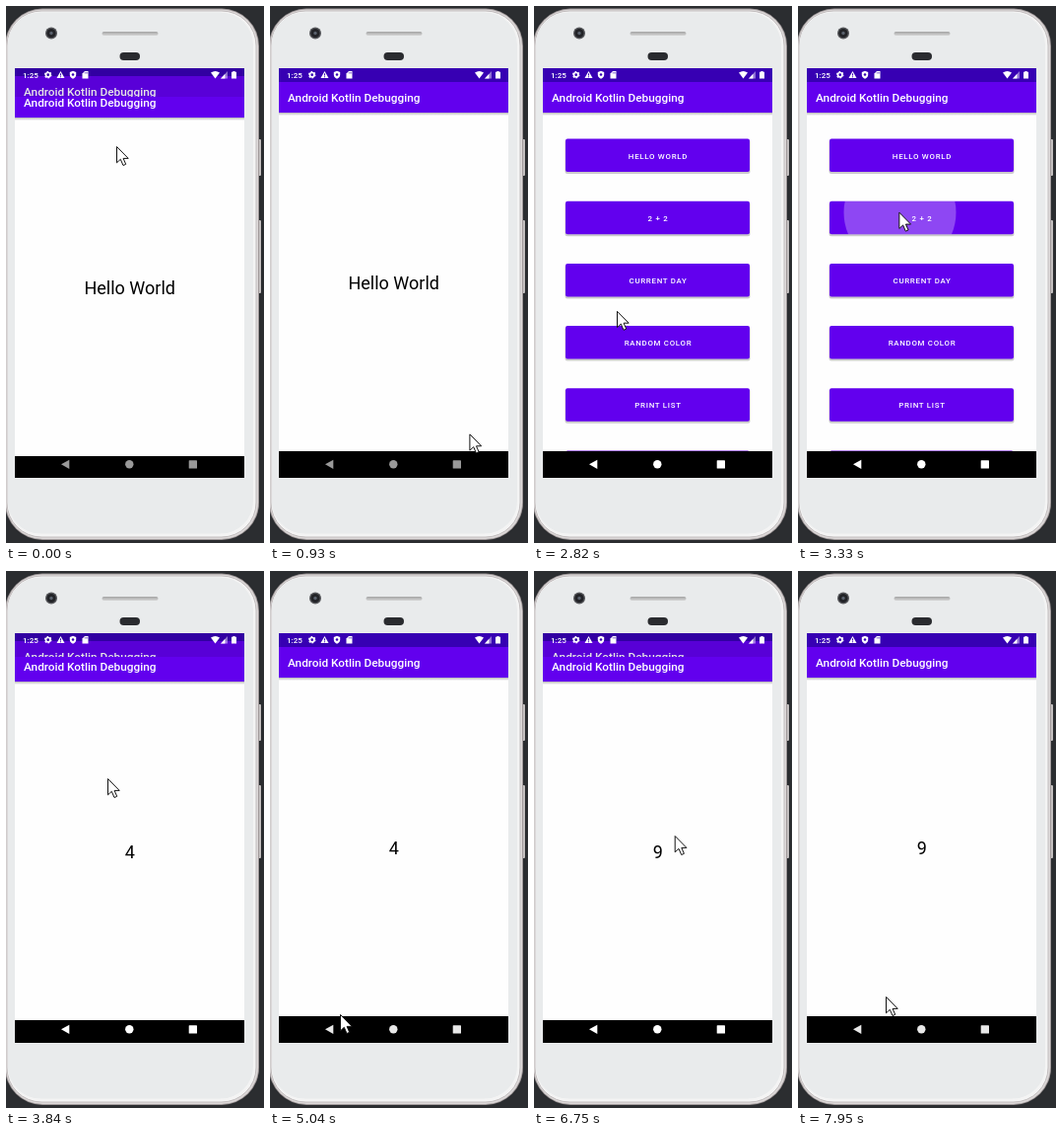
An HTML page for the animation above (8 s loop, 262x544 px).

```html
<!DOCTYPE html>
<html lang="en">
<head>
<meta charset="utf-8">
<title>Phone demo</title>
<style>
  html, body { margin: 0; width: 100%; height: 100%; overflow: hidden; background: #2b2d30; }
  svg { display: block; }
  text { font-family: Roboto, sans-serif; }
  .bar { font-size: 11.8px; font-weight: 500; fill: #fff; }
  .btn { font-size: 7.9px; font-weight: 500; letter-spacing: .089em; fill: #fff; text-anchor: middle; }
</style>
</head>
<body>
<svg width="262" height="544" viewBox="0 0 262 544">
  <defs>
    <linearGradient id="shade" x2="0" y2="1">
      <stop stop-color="#000" stop-opacity=".28"/>
      <stop offset="1" stop-color="#000" stop-opacity="0"/>
    </linearGradient>
    <linearGradient id="speaker" x2="0" y2="1">
      <stop stop-color="#a3a3a3"/>
      <stop offset="1" stop-color="#d6d6d6"/>
    </linearGradient>
    <clipPath id="screen"><rect x="9" y="63" width="233" height="415"/></clipPath>
    <clipPath id="reveal"><rect id="edge" x="9" width="233" height="420"/></clipPath>
    <clipPath id="ink"><rect id="inkBox" x="32" width="187" height="33.5" rx="2"/></clipPath>
    <g id="window">
      <rect x="9" y="55" width="233" height="430" fill="#fefefe"/>
      <rect x="9" y="108" width="233" height="3" fill="url(#shade)"/>
      <rect x="9" y="63" width="233" height="14" fill="#3700b3"/>
      <rect x="9" y="77" width="233" height="31" fill="#6200ee"/>
      <text class="bar" x="18" y="97">Android Kotlin Debugging</text>
    </g>
    <rect id="navBar" x="9" y="451" width="233" height="45"/>
  </defs>

  <!-- phone body -->
  <rect x="256" y="135" width="3" height="37" rx="1" fill="#c4c0c0"/>
  <rect x="256" y="217" width="3" height="74" rx="1" fill="#c4c0c0"/>
  <rect x="-1" y="2.5" width="258" height="538.5" rx="38" fill="#a29b9c"/>
  <rect x="0" y="3.5" width="256" height="536.5" rx="37" fill="#dedada"/>
  <rect x="1" y="5" width="253" height="533" rx="35" fill="#f4f4f4" stroke="#c3bebf"/>
  <rect x="2" y="6.5" width="249" height="528" rx="33" fill="#e9ebec"/>
  <circle cx="46" cy="27.5" r="6" fill="#55565a"/>
  <circle cx="46" cy="27.5" r="4.6" fill="#222327"/>
  <circle cx="46" cy="27.5" r="1.7" fill="#5a616c"/>
  <rect x="97.5" y="26" width="57" height="4" rx="2" fill="url(#speaker)"/>
  <rect x="115.5" y="47" width="20.5" height="8" rx="4" fill="#2a2b2f"/>

  <g clip-path="url(#screen)">
    <g id="back">
      <use href="#window"/>
      <g id="buttons"></g>
      <g id="ripples" clip-path="url(#ink)" fill="#fff">
        <circle id="wave"/>
        <circle id="echo" cx="125.5" cy="278"/>
      </g>
      <g id="labels"></g>
      <use href="#navBar"/>
    </g>
    <rect id="dim" x="9" y="63" width="233" height="415"/>
    <g id="front" clip-path="url(#reveal)">
      <g id="slide">
        <use href="#window"/>
        <text id="result" x="125.7" y="287" font-size="18" text-anchor="middle"></text>
        <use href="#navBar"/>
      </g>
    </g>

    <!-- status icons -->
    <text x="17" y="73" font-size="8" font-weight="500" fill="#fff">1:25</text>
    <g fill="#fff">
      <circle cx="42.7" cy="69.7" r="2.2" fill="none" stroke="#fff" stroke-width="1.7"/>
      <circle cx="42.7" cy="69.7" r="3.2" fill="none" stroke="#fff" stroke-width="1.2" stroke-dasharray="1.68"/>
      <path d="M55.5 66l4 7h-8z"/>
      <path d="M55.5 68.3v2.2m0 .8v1" stroke="#3700b3"/>
      <path d="M68 65.7l3.2 1.3v2.5q0 3-3.2 4.3-3.2-1.3-3.2-4.3V67z"/>
      <circle cx="68" cy="69.5" r="1.3" fill="#3700b3"/>
      <path d="M80 66h3.5v7.5h-6V68.5z"/>
      <path d="M80.2 67v1.5m1.2-1.5v1.5m1.2-1.5v1.5" stroke="#3700b3" stroke-width=".5"/>
      <path d="M208 67.5q4.5-3 9 0l-4.5 6z"/>
      <path d="M225 66v7.5h-7z" opacity=".45"/>
      <path d="M222.5 68.7v4.8h-4.5z"/>
      <path d="M230.5 66h2v.8h1.5v6.7h-5v-6.7h1.5z"/>
    </g>

    <g id="nav">
      <path d="M56 464.3l8.3-4.6v9.2z"/>
      <circle cx="125.3" cy="464.3" r="4.2"/>
      <rect x="185.7" y="460.2" width="8.3" height="8.3" rx=".6"/>
    </g>
  </g>

  <path id="cursor" d="M0 0V16.3L3.8 12.8 6.5 19 9.2 17.8 6.6 11.9H11.7Z" fill="#fff" stroke="#111" stroke-linejoin="round"/>
</svg>

<script>
const LOOP = 8000, STEP = 132.6;
const el = id => document.getElementById(id);
const set = (id, attrs) => { for (const k in attrs) el(id).setAttribute(k, attrs[k]); };
const clamp = v => Math.max(0, Math.min(1, v));
const moveY = y => ({ transform: `translate(0 ${Math.round(y)})` });

const rowY = n => 134.5 + n * 63.2;
["HELLO WORLD", "2 + 2", "CURRENT DAY", "RANDOM COLOR", "PRINT LIST", ""].forEach((label, n) => {
  const y = rowY(n);
  el("buttons").innerHTML +=
    `<rect x="31.5" y="${y + 1}" width="188" height="34.5" rx="2.5" opacity=".2"/>
     <rect x="32" y="${y}" width="187" height="33.5" rx="2" fill="#6200ee"/>`;
  el("labels").innerHTML += `<text class="btn" x="126" y="${y + 20}">${label}</text>`;
});

// Result screens: the steps at which each opens and closes, and the tap before it
const visits = [
  { text: "Hello World", open: -1.9, close: 18, row: 0, x: 113, y: 143 },
  { text: "4", open: 27, close: 41, row: 1, x: 103.5, y: 209 },
  { text: "9", open: 49, close: 70, row: 2, x: 142, y: 269, echo: .11 }
];

// Cursor stops: step, x, y
const stops = [
  [0, 113, 143], [6, 195, 485], [11, 237, 232], [16, 45, 492], [18, 58, 461],
  [23, 103, 209], [29, 104, 211], [35, 167, 335], [38, 72, 450], [41, 70, 463],
  [46, 143, 269], [53, 144, 269], [57, 182, 310], [60, 90, 432]
];

function cursorAt(s) {
  const j = Math.max(1, stops.findIndex(k => k[0] >= s));
  const [s0, x0, y0] = stops[j - 1], [s1, x1, y1] = stops[j];
  const f = (s - s0) / (s1 - s0);
  return [x0 + (x1 - x0) * f, y0 + (y1 - y0) * f];
}

function draw(t) {
  const s = Math.floor((t + 25) / STEP);
  const visit = visits.findLast(v => s >= v.open - 2);
  const rise = 1 - (1 - clamp((s - visit.open) / 4)) ** 2;
  const p = Math.min(rise, clamp(1 - (s - visit.close) / 3));

  const [x, y] = cursorAt(s);
  set("cursor", { transform: `translate(${x - .5} ${y - .5})` });

  set("back", moveY(-8 * p));
  set("dim", { opacity: .13 * p });
  set("front", { visibility: p ? "visible" : "hidden" });
  set("edge", { y: Math.round(63 + 388 * (1 - p) ** 2) });
  set("slide", moveY(17 * (1 - p)));
  set("nav", { fill: s < 20 ? "#999" : p < 1 ? "#fff" : "#e8e8e8" });
  el("result").textContent = visit.text;

  const age = s - visit.open + 2, r = 57 + age * 55;
  set("ripples", { visibility: age < 3 ? "inherit" : "hidden" });
  set("inkBox", { y: rowY(visit.row) });
  set("wave", { cx: visit.x, cy: visit.y, r, opacity: .28 - age * .08 });
  set("echo", { r, opacity: age ? 0 : visit.echo || 0 });
}

const start = performance.now();
function tick() {
  draw((performance.now() - start) % LOOP);
  requestAnimationFrame(tick);
}
tick();
</script>
</body>
</html>
```
